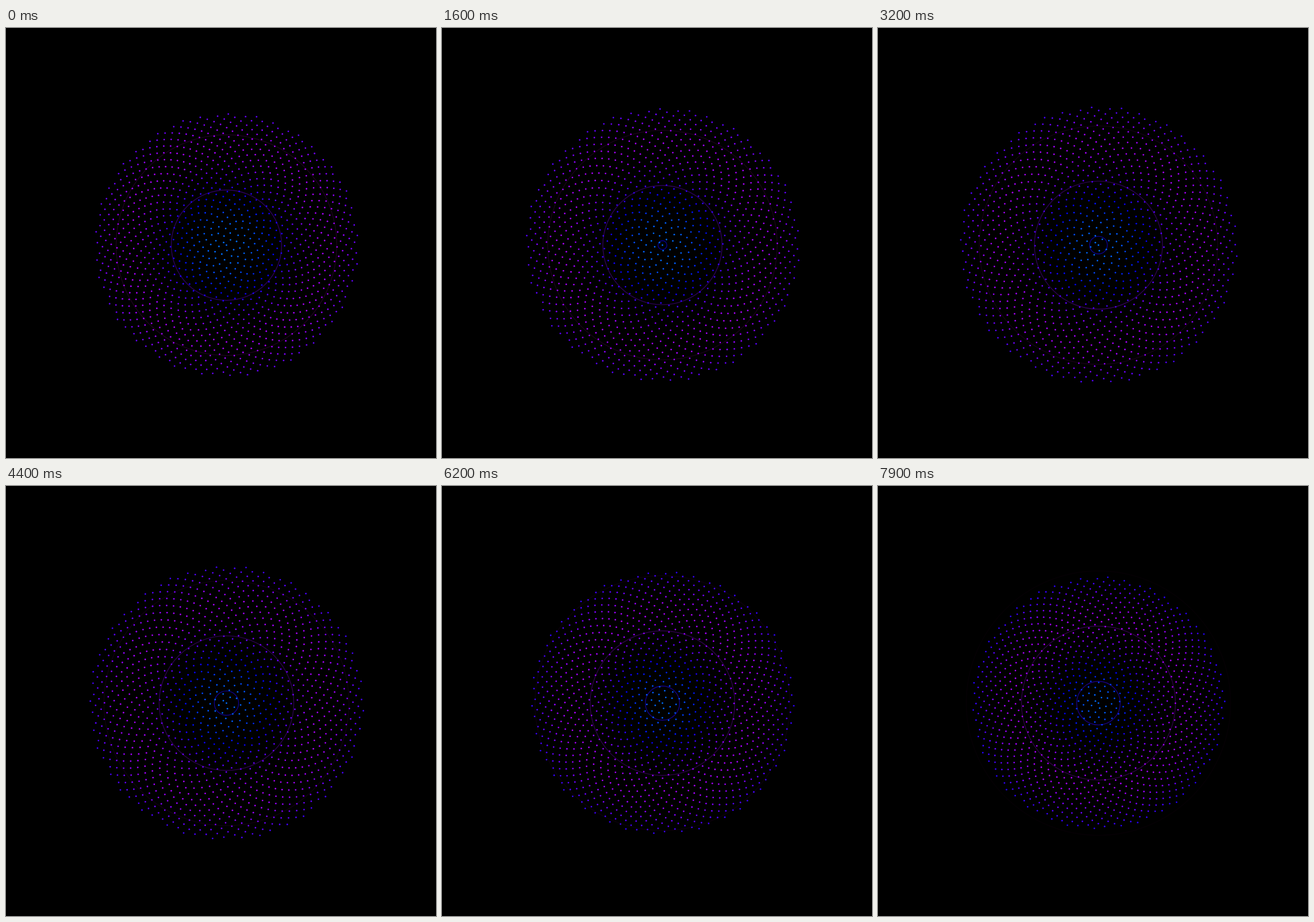
Write an HTML page with a canvas that moves like this. It is 748 px wide and 748 px high and loops after 8 s.

```html
<!DOCTYPE html>
<html lang="en">
<head>
<meta charset="utf-8">
<title>Breathing spiral</title>
<style>
  html, body { margin: 0; width: 100%; height: 100%; overflow: hidden; background: #000; }
  canvas { display: block; }
</style>
</head>
<body>
<canvas id="stage" width="748" height="748"></canvas>
<script>
const ctx = document.getElementById('stage').getContext('2d');
const LOOP = 8000, STEP = 100;
const CX = 383.5, CY = 377.7;
const COUNT = 1200, GOLDEN = Math.PI * (3 - Math.sqrt(5));
const RING_GAP = 96, RING_MAX = 240;

function circle(x, y, r) {
  ctx.beginPath();
  ctx.arc(x, y, r, 0, Math.PI * 2);
}

// Rings grow from the centre and fade on the way out
function drawRings(t) {
  ctx.lineWidth = 1.4;
  for (let r = 4.8 * t; r < RING_MAX; r += RING_GAP) {
    if (r <= 0) continue;
    ctx.strokeStyle = `hsla(${240 + r * 0.3}, 100%, 50%, ${0.6 * (1 - r / RING_MAX)})`;
    circle(CX, CY, r);
    ctx.stroke();
  }
}

// Sunflower spiral: spacing breathes, the whole turns slowly, hue waves along the radius
function drawDots(t) {
  const spacing = 6.628 * (1 + 0.0519 * Math.sin(0.52 * t));
  for (let n = 0; n < COUNT; n++) {
    const root = Math.sqrt(n);
    const angle = -n * GOLDEN - 0.0198 * t;
    const hue = 247 + 33 * Math.sin(0.132 * root - 1.9 + 0.055 * t);
    ctx.fillStyle = `hsl(${hue}, 100%, 50%)`;
    circle(CX + spacing * root * Math.cos(angle), CY + spacing * root * Math.sin(angle), 1.4);
    ctx.fill();
  }
}

function draw(now) {
  const t = Math.floor(now % LOOP / STEP) * STEP / 1000;
  ctx.fillStyle = '#000';
  ctx.fillRect(0, 0, 748, 748);
  drawRings(t);
  drawDots(t);
}

let start;
function frame(now) {
  start ??= now;
  draw(now - start);
  requestAnimationFrame(frame);
}
draw(0);
requestAnimationFrame(frame);
</script>
</body>
</html>
```
